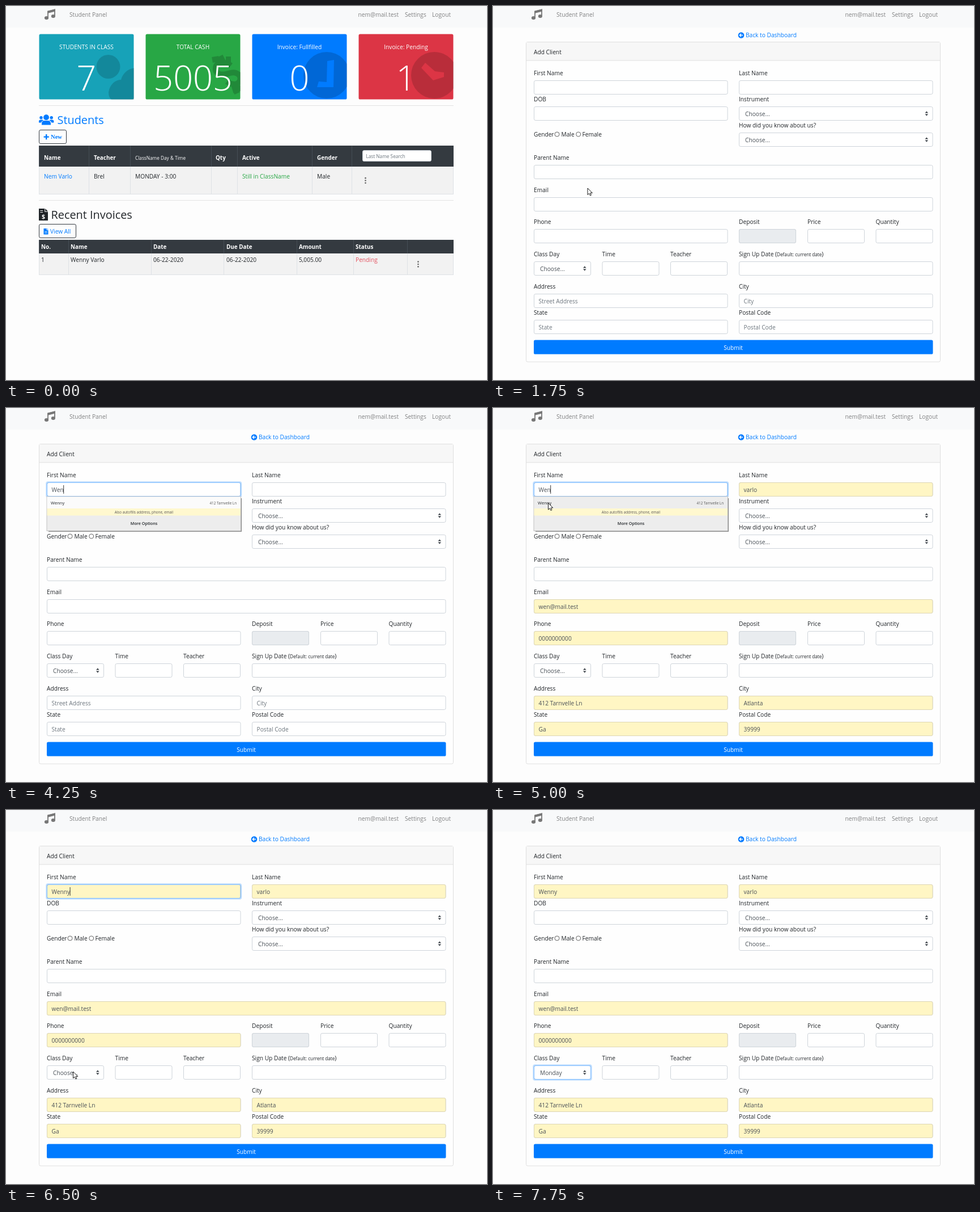
An HTML page that plays this animation: 849 by 659 pixels, repeating every 8 s.

```html
<!DOCTYPE html>
<html lang="en">
<head>
<meta charset="utf-8">
<title>Student Panel</title>
<style>
  html, body { margin: 0; width: 100%; height: 100%; overflow: hidden; background: #fdfdfd; }
  svg { display: block; }
  text { font: 10.2px "Open Sans", "Noto Sans", sans-serif; fill: #212529; white-space: pre; }
  .mid { text-anchor: middle; }
  .end { text-anchor: end; }
  .nav { fill: #808182; }
  .white { fill: #fff; }
  .blue { fill: #007bff; }
  .green { fill: #28a745; }
  .red { fill: #e4505e; }
  .value { fill: #495057; }
  .hint { fill: #6c757d; }
  .head { font-size: 9.9px; font-weight: 700; fill: #fff; }
  .small { font-size: 8.25px; }
  .tiny { font-size: 6.3px; fill: #555; }
  .title { font-size: 19.9px; }
  .count { font-size: 61px; font-weight: 300; fill: #fff; text-anchor: middle; }
  .serif { font: bold 10.6px "Liberation Serif", serif; }
  .field { fill: #fff; stroke: #ced4da; }
  .auto { fill: #fff6c4; stroke: #ddd6b4; }
  .button { fill: #fdfdfd; stroke: #343a40; }
  .hover .button { fill: #343a40; }
  .hover .blue { fill: #0056b3; }
  .ring { fill: none; stroke: #80bdff; }
  .glow { fill: none; stroke: #007bff; stroke-opacity: .25; stroke-width: 2.4; }
</style>
</head>
<body>
<svg id="stage" width="849" height="659" viewBox="0 0 849 659"></svg>
<script>
const text = (x, y, s, cls = '') => `<text x="${x}" y="${y}" class="${cls}">${s}</text>`;
const rect = (x, y, w, h, fill, extra = '') =>
  `<rect x="${x}" y="${y}" width="${w}" height="${h}" fill="${fill}" ${extra}/>`;
const box = (x, y, w, h = 25, cls = 'field') =>
  `<rect class="${cls}" x="${x + .5}" y="${y + .5}" width="${w - 1}" height="${h - 1}" rx="2.6"/>`;
const path = (d, fill, extra = '') => `<path d="${d}" fill="${fill}" ${extra}/>`;
const dot = (x, y, r, fill, extra = '') => `<circle cx="${x}" cy="${y}" r="${r}" fill="${fill}" ${extra}/>`;
const group = (id, body) => `<g id="${id}">${body}</g>`;
const line = (color, width) => `stroke="${color}" stroke-width="${width}"`;

const BLUE = '#007bff', DARK = '#343a40', SHADE = 'rgba(0,0,0,.16)';

function navbar() {
  return rect(0, 0, 849, 38, '#f8f9fa') +
    path('M74 20V9.5L86 6.5V17', 'none', line('#777', 1.8)) +
    path('M73.2 9L87 5.5V9.6L73.2 13Z', '#777') +
    '<g fill="#777"><ellipse cx="71.5" cy="21" rx="3.6" ry="3"/><ellipse cx="83.4" cy="18" rx="3.6" ry="3"/></g>' +
    text(112, 19, 'Student Panel', 'nav') + text(693, 19, 'nem@mail.test', 'nav end') +
    text(704, 19, 'Settings', 'nav') + text(752, 19, 'Logout', 'nav');
}

function card(x, color, title, count, icon) {
  return `<svg x="${x}" y="49" width="168" height="116" viewBox="${x} 49 168 116">` +
    rect(x + .5, 49.5, 167, 115, color, 'rx="2.6"') + icon + '</svg>' +
    text(x + 84, 76, title, 'white mid') + text(x + 84, 148.5, count, 'count');
}

function cards() {
  const people = dot(180.5, 107, 21, SHADE) +
    path('M181 152C183 138 193 130 203 130C206 118 216 110 228 109V167H190C184 165 181 160 181 152Z', SHADE);
  const dollar = `<g fill="none" stroke="rgba(0,0,0,.18)" stroke-width="10">` +
    '<path d="M397 105C385 96 369 99 370 111C371 124 386 121 396 118C407 115 416 122 413 131C410 140 398 139 390 133M378 88L384 100M401 137L408 154M364 95L376 93M388 94H397M400 149L416 144"/></g>';
  const clock = (x, color, hands) => dot(x, 122, 41, SHADE) + path(hands, color);
  return card(58, '#17a2b8', 'STUDENTS IN CLASS', '7', people) +
    card(246, '#28a745', 'TOTAL CASH', '5005', dollar) +
    card(434, BLUE, 'Invoice: Fullfilled', '0',
      clock(566, BLUE, 'M567 97L579 95L578 143L549 143L552 133L566 134Z')) +
    card(622, '#dc3545', 'Invoice: Pending', '1',
      clock(756, '#dc3545', 'M740 100L757 115L773 117V125L754 131L733 109Z'));
}

function table(top, headHeight, rowHeight, columns, rowId) {
  const bottom = top + headHeight + rowHeight, mid = top + headHeight;
  return rect(58, top, 732, headHeight, DARK) +
    rect(58, mid, 732, rowHeight, '#f2f2f2', `id="${rowId}"`) +
    columns.map(x => rect(x, top, 1, headHeight, '#454d55') + rect(x, mid, 1, rowHeight, '#dee2e6')).join('') +
    rect(58, bottom - 1, 732, 1, '#dee2e6') + rect(789, mid, 1, rowHeight, '#dee2e6');
}

const menuDots = (x, y) => [-4.3, 0, 4.3].map(d => dot(x, y + d, 1.35, '#666')).join('');
const cells = (y, cls, list) => list.map(([x, s, own]) => text(x, y, s, own ?? cls)).join('');

function fileIcon(x, y, w, h, color) {
  const f = w * .36;
  return path(`M${x} ${y}h${w - f}v${f}h${f}v${h - f}h${-w}Z`, color, 'stroke-linejoin="round"') +
    path(`M${x + w - f + 1} ${y}l${f - 1} ${f - 1}h${1 - f}Z`, color);
}

function dashboard() {
  const users = dot(71, 196.2, 4.9, BLUE) + dot(62, 196.7, 2.7, BLUE) + dot(80.2, 196.7, 2.7, BLUE) +
    path('M63 209.5V207.5C63 203 66 202 68 202H74C76 202 79 203 79 207.5V209.5Z', BLUE) +
    path('M58 205.5V203.5Q58 200.5 61 200.5H64.5L66 201.5Q62.5 203 62 205.5Z', BLUE) +
    path('M84.4 205.5V203.5Q84.4 200.5 81.4 200.5H78L76.5 201.5Q80 203 80.4 205.5Z', BLUE);
  return cards() +
    rect(58, 175, 732, 1, 'rgba(0,0,0,.1)') + rect(58, 342, 732, 1, 'rgba(0,0,0,.1)') +
    users + text(90.5, 208, 'Students', 'title blue') +
    group('newButton', box(58, 218, 49, 25, 'button') +
      '<path class="blue" d="M70 226h2.4v3.4h3.4v2.4h-3.4v3.4h-2.4v-3.4h-3.4v-2.4h3.4Z"/>' +
      text(79, 234.3, 'New', 'blue serif')) +
    table(246, 37, 49, [58, 146, 219, 362, 408, 540, 610], 'studentRow') +
    cells(271, 'head', [[67, 'Name'], [155, 'Teacher'], [228, 'ClassName Day &amp; Time', 'small white'],
      [370, 'Qty'], [417, 'Active'], [549, 'Gender']]) +
    box(629, 254, 122, 20) + text(635.5, 267.7, 'Last Name Search', 'small hint') +
    cells(303.7, '', [[67, 'Nem Varlo', 'blue'], [155, 'Brel'], [228, 'MONDAY - 3:00'],
      [417, 'Still in ClassName', 'green'], [549, 'Male']]) + menuDots(634.5, 307.5) +
    fileIcon(58, 357, 16, 21, '#212529') +
    path('M60.5 360.5H65M60.5 363.5H65', 'none', line('#fdfdfd', 1.1)) +
    '<text x="66" y="375" class="white mid" style="font-size:10.5px;font-weight:700">$</text>' +
    text(79.5, 375, 'Recent Invoices', 'title') +
    box(58, 384, 66, 25, 'button') + fileIcon(66.5, 392, 8, 10.5, BLUE) +
    path('M68.3 397.5H72.8M68.3 399.8H72.8', 'none', line('#fff', .8)) + text(78, 401, 'View All', 'blue') +
    table(412, 24, 38, [58, 110, 256, 384, 513, 613, 708], 'invoiceRow') +
    cells(428, 'head', [[62, 'No.'], [114, 'Name'], [260, 'Date'], [389, 'Due Date'], [517, 'Amount'], [617, 'Status']]) +
    cells(451.3, '', [[62, '1'], [114, 'Wenny Varlo'], [260, '06-22-2020'], [389, '06-22-2020'],
      [517, '5,005.00'], [617, 'Pending', 'red']]) + menuDots(727.5, 455);
}

const HALF = 342.5, FULL = 704.5, SHORT = 101;
const input = (x, y, w, label, hint = '') =>
  text(x, y - 8.8, label) + box(x, y, w) + text(x + 8.5, y + 16.7, hint, 'hint');
const chooser = (x, y, w, label, body = text(x + 11, y + 16.7, 'Choose...', 'value')) =>
  text(x, y - 8.8, label) + box(x, y, w) + body +
  path(`M${x + w - 14} ${y + 11.6}h5.6l-2.8 -3.2ZM${x + w - 14} ${y + 13.4}h5.6l-2.8 3.2Z`, DARK);
const filled = (x, y, w, value) => box(x, y, w, 25, 'auto') + text(x + 8.5, y + 16.7, value, 'value');
const ring = (id, x, y, w) => group(id, box(x - 1, y - 1, w + 2, 27, 'glow') + box(x, y, w, 25, 'ring'));

function suggestions() {
  return rect(75, 159, 341, 59, '#8a8a8a') + rect(72, 156, 342.5, 60.5, '#ededed', line('#b5b5b5', .8)) +
    rect(72.5, 156.5, 341.5, 20.5, '#fbfbfb', 'id="offer"') + rect(72.5, 177, 341.5, 12.5, '#fff8cf') +
    '<text x="79" y="170" style="font-size:7.6px">Wenny</text>' +
    text(407, 169.5, '412 Tarnvelle Ln', 'tiny end') +
    text(243.5, 185.5, 'Also autofills address, phone, email', 'tiny mid') +
    '<text x="243.5" y="205.8" class="mid" style="font-size:7.2px;font-weight:600">More Options</text>';
}

const OPTIONS = ['Choose...', 'Monday', 'Tuesday', 'Wednesday', 'Thursday', 'Friday', 'Saturday', 'Sunday'];
const dayList = () => rect(72.5, 475.5, 100, 168, '#fff', line('#b5b5b5', 1)) +
  rect(73, 476, 99, 21, '#1e90ff', 'id="dayMark"') +
  OPTIONS.map((s, i) => text(83, 490 + i * 21, s, 'value day')).join('');

function form() {
  return dot(438, 51.5, 5.3, BLUE) + path('M441 51.5H435.5M438 48.7L435.2 51.5L438 54.3', 'none', line('#fff', 1.3)) +
    text(446, 55.3, 'Back to Dashboard', 'blue') +
    rect(58.5, 63.5, 731, 563.5, '#fefefe', 'rx="2.6" stroke="#dfdfdf"') +
    rect(59, 64, 730, 32, '#f7f7f7') + rect(59, 95.5, 730, 1, '#dfdfdf') + text(72, 84.5, 'Add Client') +
    input(72, 131, HALF, 'First Name') + input(434, 131, HALF, 'Last Name') +
    input(72, 177, HALF, 'DOB') + chooser(434, 177, HALF, 'Instrument') +
    text(72, 230, 'Gender') + text(120.5, 230, 'Male') + text(157.5, 230, 'Female') +
    [113, 150.7].map(x => dot(x, 226, 4, '#fff', line('#555', .9))).join('') +
    chooser(434, 223, HALF, 'How did you know about us?') +
    input(72, 280, FULL, 'Parent Name') + input(72, 337, FULL, 'Email') +
    input(72, 393, HALF, 'Phone') + input(434, 393, SHORT, 'Deposit') +
    rect(434.5, 393.5, 100, 24, '#e9ecef', 'rx="2.6" stroke="#ced4da"') +
    input(555, 393, SHORT, 'Price') + input(675.5, 393, SHORT, 'Quantity') +
    chooser(72, 450, SHORT, 'Class Day', '<text id="day" x="83" y="466.7" class="value"></text>') +
    input(192.5, 450, SHORT, 'Time') + input(313, 450, SHORT, 'Teacher') +
    input(434, 450, HALF, 'Sign Up Date (<tspan class="small" style="font-size:8.2px">Default: current date</tspan>)') +
    input(72, 507, HALF, 'Address', 'Street Address') + input(434, 507, HALF, 'City', 'City') +
    input(72, 553, HALF, 'State', 'State') + input(434, 553, HALF, 'Postal Code', 'Postal Code') +
    rect(72, 588.5, FULL, 25, BLUE, 'rx="2.6"') + text(424, 605.5, 'Submit', 'white mid') +
    group('autofill', filled(434, 131, HALF, 'varlo') + filled(72, 337, FULL, 'wen@mail.test') +
      filled(72, 393, HALF, '0000000000') + filled(72, 507, HALF, '412 Tarnvelle Ln') +
      filled(434, 507, HALF, 'Atlanta') + filled(72, 553, HALF, 'Ga') + filled(434, 553, HALF, '39999')) +
    group('firstFill', box(72, 131, HALF, 25, 'auto')) +
    ring('firstRing', 72, 131, HALF) + ring('dayRing', 72, 450, SHORT) +
    '<text id="first" x="80.5" y="147.7" class="value"></text>' + rect(80, 136, 1, 15, '#333', 'id="caret"') +
    group('suggest', suggestions()) + group('dayList', dayList());
}

const pointers =
  group('arrow', path('M0 0V11.6L2.7 9.2L4.5 13L6.4 12.1L4.7 8.4H8.3Z', '#fff', line('#000', .9))) +
  group('hand', path('M-1 1Q0 -1 1.4 1V5.5L6 6.6Q7.6 7 7.4 9L6.4 14.5H0L-3.6 9Q-3.4 7 -1 9Z', '#fff', line('#000', .9)) +
    path('M2.4 11V13M4.4 11V13', 'none', line('#000', .6))) +
  group('beam', path('M-2 -6.5H2M0 -6.5V6.5M-2 6.5H2', 'none', line('#222', 1)));

const stage = document.getElementById('stage');
stage.innerHTML = group('dashboard', dashboard()) + group('form', form()) + navbar() + pointers;

const el = id => document.getElementById(id);
const show = (id, on) => el(id).style.display = on ? '' : 'none';
const within = (n, from, to) => n >= from && n < to;

const STEP = 250, STEPS = 32;

// Pointer legs: [first step, last step, shape, from, to]
const LEGS = [
  [1, 3, 'arrow', [215, 415], [118, 262]],
  [4, 6, 'hand', [95.5, 231], [95.5, 231]],
  [7, 8, 'arrow', [167, 321], [162, 225]],
  [9, 10, 'beam', [159, 143], [159, 143]],
  [19, 19, 'arrow', [112, 186], [112, 186]],
  [20, 21, 'arrow', [97.5, 167.5], [97.5, 168]],
  [22, 26, 'arrow', [98, 190], [118.5, 461]],
  [27, 28, 'arrow', [118.5, 462], [116, 505]],
  [29, 29, 'arrow', [150, 492], [150, 492]],
  [30, 30, 'beam', [248, 469], [248, 469]]
];

function movePointer(n) {
  const leg = LEGS.find(([from, to]) => n >= from && n <= to);
  for (const id of ['arrow', 'hand', 'beam']) show(id, leg && leg[2] === id);
  if (!leg) return 0;
  const [from, to, id, a, b] = leg;
  const p = to > from ? (n - from) / (to - from) : 0;
  const [x, y] = a.map((v, i) => v + (b[i] - v) * p);
  el(id).setAttribute('transform', `translate(${x} ${y})`);
  return y;
}

function draw(n) {
  const y = movePointer(n);
  show('dashboard', n < 7);
  show('form', n >= 7);
  el('newButton').setAttribute('class', within(n, 4, 7) ? 'hover' : '');
  el('studentRow').setAttribute('fill', n < 4 && within(y, 283, 332) ? '#ececec' : '#f2f2f2');

  const name = n < 15 ? '' : n < 21 ? 'Wen'.slice(0, n - 14) : 'Wenny';
  el('first').textContent = name;
  const width = name && n >= 7 ? el('first').getComputedTextLength() : 0;
  el('caret').setAttribute('x', 80 + width);
  show('caret', within(n, 11, 13) || within(n, 15, 27));
  show('firstRing', within(n, 11, 27));
  show('firstFill', n >= 21);
  show('suggest', within(n, 15, 21));
  show('autofill', n >= 20);
  el('offer').setAttribute('fill', n === 20 ? '#ededed' : '#fbfbfb');

  show('dayRing', n >= 27);
  show('dayList', within(n, 27, 29));
  el('day').textContent = OPTIONS[n < 29 ? 0 : 1];
  const marked = n < 28 ? 0 : 1;
  el('dayMark').setAttribute('y', 476 + marked * 21);
  document.querySelectorAll('.day').forEach((t, i) => t.style.fill = i === marked ? '#fff' : '');
}

let last = -1;
function tick(now) {
  const n = Math.floor(now / STEP) % STEPS;
  if (n !== last) draw(last = n);
  requestAnimationFrame(tick);
}
draw(0);
requestAnimationFrame(tick);
</script>
</body>
</html>
```
